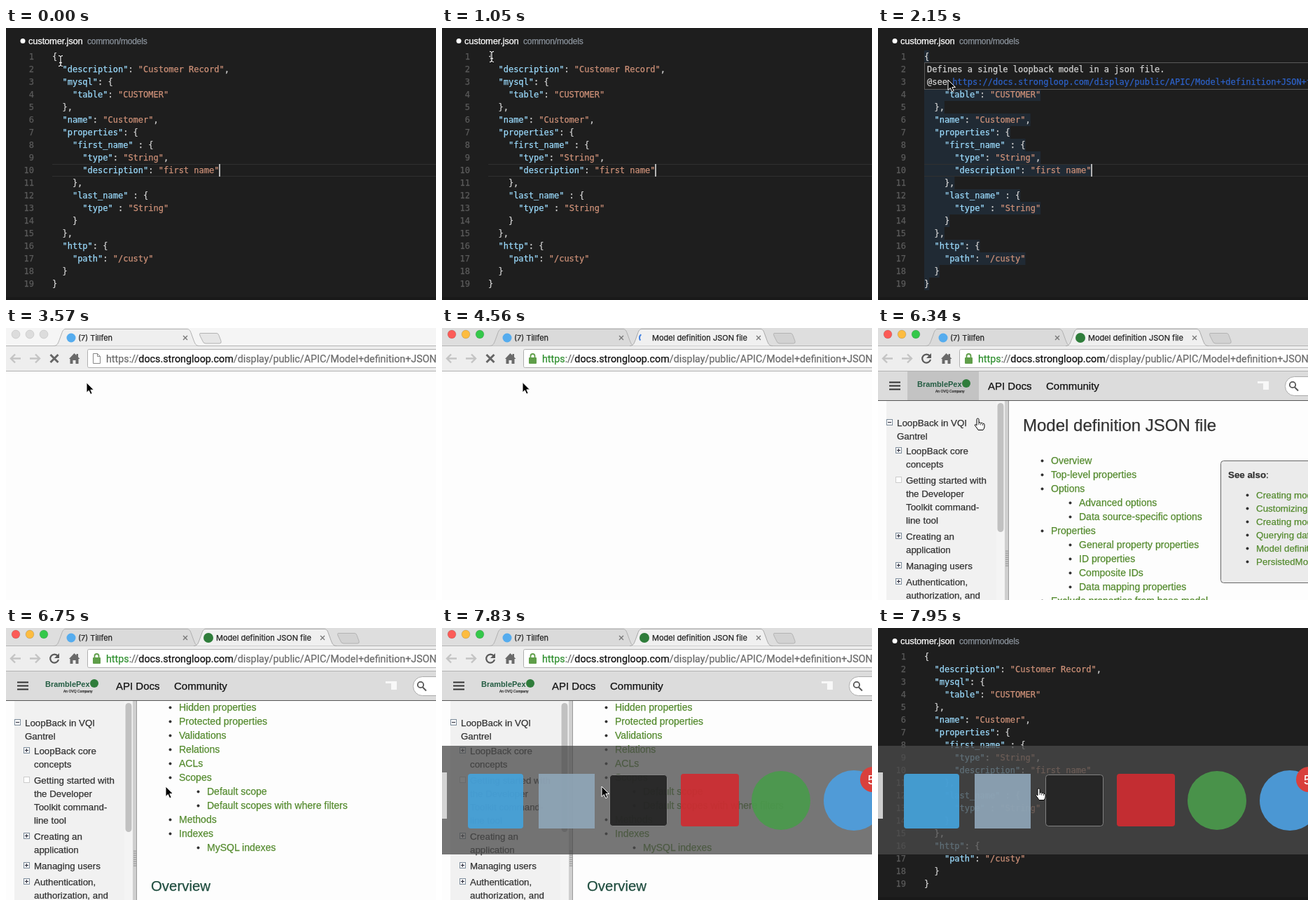
An HTML page that plays this animation: 614 by 388 pixels, repeating every 8000 ms.

```html
<!DOCTYPE html>
<html lang="en">
<head>
<meta charset="utf-8">
<title>Schema hover</title>
<style>
html, body { margin: 0; width: 100%; height: 100%; overflow: hidden; background: #1e1e1e; }
svg { display: block; }
/* The thin outline gives the text a slightly heavier weight. */
text { white-space: pre; font: 14px "Liberation Sans", Arial, sans-serif; color: #333;
  fill: currentColor; stroke: currentColor; stroke-width: .25px; }
.small text { font-size: 13.33px; }
.code text { font: 12px "DejaVu Sans Mono", monospace; color: #d4d4d4; }
.code .key { color: #9cdcfe; }
.code .string { color: #ce9178; }
.code .number { color: #5a5a5a; text-anchor: end; }
.code .link { color: #2d62c8; }
.code .file { font: 13px "Liberation Sans", sans-serif; letter-spacing: -.2px; color: #fff; }
.code .folder { font: 12px "Liberation Sans", sans-serif; letter-spacing: -.2px; color: #8b939c; }
.tabs text { font: 11px Inter, sans-serif; color: #222; }
.url { font: 14.3px Roboto, sans-serif; color: #6b6b6b; }
.domain { color: #111; }
.safe { color: #2f8f2f; }
.nav { font-size: 15px; color: #111; }
text.a { color: #558b2f; }
</style>
</head>
<body>
<svg id="stage" width="614" height="388" viewBox="0 0 614 388"></svg>
<script>
const DURATION = 8000, CHAR = 7.224, LINE = 18;

// Markup helpers
const text = (x, y, s, attrs = '') => `<text x="${x}" y="${y}" ${attrs}>${s}</text>`;
const rect = (x, y, w, h, fill, attrs = '') =>
  `<rect x="${x}" y="${y}" width="${w}" height="${h}" fill="${fill}" ${attrs}/>`;
const circle = (x, y, r, fill, attrs = '') => `<circle cx="${x}" cy="${y}" r="${r}" fill="${fill}" ${attrs}/>`;
const path = (d, attrs) => `<path d="${d}" ${attrs}/>`;
const stroke = (d, color, width = 1, attrs = '') =>
  path(d, `fill="none" stroke="${color}" stroke-width="${width}" ${attrs}`);
const group = (id, body, attrs = '') => `<g id="${id}" ${attrs}>${body}</g>`;

// Editor
const source = `{
  "description": "Customer Record",
  "mysql": {
    "table": "CUSTOMER"
  },
  "name": "Customer",
  "properties": {
    "first_name" : {
      "type": "String",
      "description": "first name"
    },
    "last_name" : {
      "type" : "String"
    }
  },
  "http": {
    "path": "/custy"
  }
}`.split('\n');

const colorize = line => line.replace(/"[^"]*"(?=(\s*:)?)/g, (s, colon) =>
  `<tspan class="${colon ? 'key' : 'string'}">${s}</tspan>`);

const editor = group('editor',
  rect(0, 0, 614, 388, '#1e1e1e') + rect(0, 384, 614, 4, '#191919') +
  circle(24, 18.5, 3.5, '#fff') +
  text(32, 23, 'customer.json', 'class="file"') + text(116, 23, 'common/models', 'class="folder"') +
  group('highlight', source.map((s, i) => rect(66, 32 + i * LINE, s.length * CHAR, LINE, '#202a34')).join('')) +
  group('currentLine', stroke('M66 194.5H614M66 211.5H614', '#303030')) +
  source.map((s, i) => {
    const y = 45 + i * LINE;
    return text(40, y, i + 1, 'class="number"') + text(66, y, colorize(s));
  }).join('') +
  group('caret', rect(304, 194, 2, 18, '#b4b4b4')) +
  group('tooltip',
    rect(66.5, 49.5, 560, 38, '#1e1e1e', 'stroke="#5a5a5a"') +
    text(70, 63, 'Defines a single loopback model in a json file.') +
    text(70, 81, '@see <tspan class="link">https://docs.strongloop.com/display/public/APIC/Model+definition+JSON+file</tspan>')),
  'class="code"');

// Browser window
const tabShape = (x, w) => `M${x} 25.5c5 0 6-3 8-8l4-11c1.5-4 3-5 6-5H${x + w - 18}c3 0 4.5 1 6 5l4 11c2 5 3 8 8 8`;
const cross = (x, y, r, color, w) =>
  stroke(`M${x - r} ${y - r}l${2 * r} ${2 * r}m0 ${-2 * r}l${-2 * r} ${2 * r}`, color, w);
const arrowIcon = (x, dir) => stroke(`M${x} 43.5h${14 * dir}m${-6 * dir} -6l${6 * dir} 6l${-6 * dir} 6`, '#c4c4c4', 2.4);
const lights = (id, colors, edge) => group(id, colors.map((c, i) =>
  circle(14 + i * 20, 9, 5.9, c, `stroke="${edge}" stroke-width=".7"`)).join(''));
const address = scheme => text(143, 49, `${scheme}://<tspan class="domain">docs.strongloop.com</tspan>` +
  '/display/public/APIC/Model+definition+JSON+file', 'class="url"');

const chrome = group('tabs',
  rect(0, 0, 614, 26, '#f5f5f5', 'id="strip"') +
  lights('idleLights', Array(3).fill('#dcdcdc'), '#c4c4c4') +
  lights('liveLights', ['#fc5b57', '#fdbc40', '#34c84a'], '#0003') +
  stroke('M0 25.5H614', '#b4b4b4') +
  path(tabShape(68, 208), 'id="tab1" stroke="#b0b0b0"') +
  circle(93, 14, 6.5, '#55acee') + text(103, 18, '(7) Tillfen') + cross(256, 14, 3, '#777', 1.3) +
  path('M277 7.5h24q2 0 3 3l3 8q1 3.5-2 3.5h-20q-3 0-4-3l-4-8q-1-3.5 0-3.5z', 'id="plus" stroke="#b4b4b4"') +
  path('', 'id="tab2" fill="#f0f0f0" stroke="#a8a8a8"') +
  group('tab2Label', text(300, 18, '', 'id="tabTitle"') + cross(452, 14, 3, '#777', 1.3) +
    path('M0-6A6 6 0 0 1 6 0', 'id="spinner" fill="none" stroke-width="2"') +
    circle(289, 14, 7, '#2f7d3b', 'id="favicon"')), 'class="tabs"') +
  rect(0, 26, 614, 36, '#eeeeee') + stroke('M0 61.5H614', '#b2b2b2') +
  arrowIcon(21, -1) + arrowIcon(34, 1) +
  group('stop', cross(69, 43.5, 5.5, '#666', 3)) +
  group('reload', stroke('M74 40A6 6 0 1 0 75 45', '#5a5a5a', 2.2) + path('M76 36v7h-7z', 'fill="#5a5a5a"')) +
  path('M90 44l7.5-8 3 3v-2h2.5v4.5l2.5 2.5h-2v7h-4v-5h-4v5h-4v-7z', 'fill="#6a6a6a"') +
  rect(116.5, 30.5, 520, 26, '#fff', 'rx="2" stroke="#b0b0b0"') +
  group('plainAddress', path('M124.5 36.5h6l4 4v10h-10zM130.5 36.5v4h4', 'fill="#fff" stroke="#888"') + address('https')) +
  group('secureAddress', stroke('M126.5 43v-3a3 3 0 0 1 6 0v3', '#5f9e49', 1.8) +
    rect(124, 42, 11, 9, '#5f9e49', 'rx="1"') + address('<tspan class="safe">https</tspan>'));

// Documentation page
const header = group('header',
  rect(0, 62, 614, 42, '#dcdcdc') + rect(42, 62, 102, 41, '#c3c3c3', 'id="logoHover"') +
  stroke('M16 77.5h16M16 82.5h16M16 87.5h16', '#333', 2) +
  text(56, 84, 'BramblePex', 'style="font-size:11px;font-weight:bold;color:#235c42;stroke:none"') +
  text(82, 91.5, 'An OVQ Company', 'style="font-size:5px"') + circle(126, 79, 6, '#2f7d3b') +
  group('menu', text(157, 88, 'API Docs', 'class="nav"') + text(240, 88, 'Community', 'class="nav"')) +
  group('tools', rect(542, 76, 8, 3, '#f8f8f8') + rect(550, 76, 8, 12, '#f8f8f8') +
    rect(581.5, 69.5, 120, 27, '#fff', 'rx="13" stroke="#aaa"') +
    circle(592, 81, 4.2, 'none', 'stroke="#555" stroke-width="1.8"') + stroke('M595 84.5l5 5', '#555', 2)) +
  stroke('M0 103.5H614', '#555'));

const treeBox = (x, y, sign) => rect(x + .5, y + .5, 8, 8, '#fff', `stroke="${sign ? '#7a8a99' : '#ccc'}"`) +
  (sign ? stroke(`M${x + 2} ${y + 4.5}h5` + (sign === '+' ? `M${x + 4.5} ${y + 2}v5` : ''), '#223') : '');
const wrapped = (x, y, lines) => lines.map((s, i) => text(x, y + i * 19, s)).join('');
const topics = [
  ['+', 180, 'LoopBack core|concepts'],
  ['', 222, 'Getting started with|the Developer|Toolkit command-|line tool'],
  ['+', 302, 'Creating an|application'],
  ['+', 344, 'Managing users'],
  ['+', 367, 'Authentication,|authorization, and'],
];
const sidebar = group('sidebar',
  rect(12, 104, 157, 284, '#f1f1f1', 'id="sidePanel"') + wrapped(27, 140, ['LoopBack in VQI', 'Gantrel']) +
  group('closedBox', treeBox(12, 130, '+')) +
  group('tree', treeBox(12, 130, '-') +
    topics.map(([sign, y, s]) => treeBox(25, y - 10, sign) + wrapped(40, y, s.split('|'))).join('') +
    rect(169, 104, 12, 284, '#f4f4f4') + rect(170.5, 107, 9, 184, '#c1c1c1', 'rx="4.5"')) +
  rect(181, 104, 6, 284, '#cfcfcf') + stroke('M186.5 104V388', '#999') +
  stroke('M183 317.5V340M185 317.5V340', '#777', 1, 'stroke-dasharray="1.5 1.5"'), 'class="small"');

// A leading dash marks a nested entry.
const contents = `Overview
Top-level properties
Options
-Advanced options
-Data source-specific options
Properties
-General property properties
-ID properties
-Composite IDs
-Data mapping properties
Exclude properties from base model
Hidden properties
Protected properties
Validations
Relations
ACLs
Scopes
-Default scope
-Default scopes with where filters
Methods
Indexes
-MySQL indexes`.split('\n');
const seeAlso = ['Creating models', 'Customizing models', 'Creating model relations', 'Querying data',
  'Model definition reference', 'PersistedModel class'];
const bullet = (x, y, s) => circle(x - 12.5, y - 4.5, 2, '#333') + text(x, y, s, 'class="a"');

const article = `<clipPath id="below"><rect x="187" y="104" width="427" height="284"/></clipPath>` +
  group('content', group('scroller',
    text(207, 147, 'Model definition JSON file', 'style="font-size:24px"') +
    group('byline', text(207, 172, 'Created by Lorn Becktree, last modified on Jun 22, 2016',
      'style="font-size:12px;color:#707070"')) +
    group('body',
      contents.map((s, i) => bullet(s[0] === '-' ? 287 : 247, 194 + i * 20, s.replace(/^-/, ''))).join('') +
      rect(489.5, 189.5, 200, 174, '#ececec', 'id="seeBox" rx="4" stroke="#666"') +
      group('related', text(500, 214, '<tspan font-weight="bold">See also</tspan>:') +
        seeAlso.map((s, i) => bullet(540, 243 + i * 19, s)).join(''), 'class="small"') +
      text(207, 671, 'Overview', 'style="font-size:20.4px;color:#1f4d3f"'))),
    'clip-path="url(#below)"');

const browser = group('browser',
  rect(0, 0, 614, 388, '#fff', 'id="paper"') + article + sidebar + header + chrome);

// App switcher, with plain shapes for the icons
const switcher = group('switcher',
  rect(0, 168, 614, 155, '#4a4a4a', 'opacity=".75"') +
  `<g opacity=".92">` +
  rect(-60, 206, 67, 66, '#dcdcdc') + rect(37, 208, 79, 78, '#45a3dc', 'rx="4"') +
  rect(138, 208, 80, 78, '#8fa6b8') +
  rect(239.5, 209.5, 82, 73, '#242424', 'rx="4" stroke="#888"') +
  rect(341, 208, 83, 75, '#cf2c31', 'rx="4"') + circle(484, 246, 42, '#4a9a4c') +
  circle(588, 246, 43, '#4d9fe0') + '</g>' +
  circle(615, 216, 18, '#d9403c') + text(608, 223, '5', 'style="font-size:18px;color:#fff"'));

const beamShape = 'M-3-7.5q3 0 3 2.5v10q0 2.5-3 2.5M3-7.5q-3 0-3 2.5M3 7.5q-3 0-3-2.5M-2 2.5h4';
const cursors = group('cursor',
  group('beam', stroke(beamShape, '#000', 3) + stroke(beamShape, '#eee', 1.3)) +
  group('arrow', path('M0 0v14.5l3.3-3 2.4 5.3 2.5-1.1-2.4-5.2h4.7z', 'fill="#000" stroke="#fff"')) +
  group('hand', path('M-1 8V1.5a1.5 1.5 0 0 1 3 0V6q2.5-1 2.8.5 2.4-.7 2.7.7 2.5-.3 2.5 1.5V12q0 2-2 4.5H1Q-1 13-4 9.5q1-2 3 .5z',
    'fill="#fff" stroke="#000"') + stroke('M2 6v3M4.8 7v2.5M7.5 8v2', '#000', .8)));

document.getElementById('stage').innerHTML = editor + browser + switcher + cursors;

const el = {};
document.querySelectorAll('#stage [id]').forEach(node => el[node.id] = node);
const show = (id, on) => { el[id].style.display = on ? '' : 'none'; };
const set = (id, name, value) => el[id].setAttribute(name, value);
const shift = (id, x, y) => set(id, 'transform', `translate(${x} ${y})`);
const ease = (t, from, to) => {
  const p = Math.min(1, Math.max(0, (t - from) / (to - from)));
  return p * p * (3 - 2 * p);
};

// Pointer stops: time, x, y
const stops = [[0, 78, 47], [420, 78, 47], [1050, 71, 41], [1640, 71, 41], [2150, 100, 74], [2440, 115, 78],
  [6339, 115, 77], [6340, 142, 129], [6400, 142, 129], [6560, 228, 226], [7890, 228, 226], [7950, 229, 229], [8000, 229, 229]];
function pointer(t) {
  const i = stops.findIndex(s => s[0] > t), [t0, x0, y0] = stops[i - 1], [t1, x1, y1] = stops[i];
  const p = ease(t, t0, t1);
  return [x0 + (x1 - x0) * p, y0 + (y1 - y0) * p];
}
function pointerKind(t) {
  if (t < 1850) return 'beam';
  const overLink = (t >= 2260 && t < 3330) || (t >= 5270 && t < 6400) || t >= 7950;
  return overLink ? 'hand' : 'arrow';
}

function draw(t) {
  const editing = t < 3330, inBrowser = !editing && t < 7950;
  const hovering = editing && t >= 1230;
  const active = t >= 3630, secure = t >= 4450, loaded = t >= 4980, ready = t >= 5270, expanded = t >= 5450;

  show('browser', inBrowser);
  show('highlight', hovering);
  show('tooltip', hovering);
  show('currentLine', editing);
  show('caret', editing && Math.floor((t + 30) / 482) % 2 === 0);

  // Window chrome
  const grow = ease(t, 3630, 3870);
  set('strip', 'fill', active ? '#dedede' : '#f5f5f5');
  show('idleLights', !active);
  show('liveLights', active);
  set('tab1', 'fill', active ? '#dadada' : '#efefef');
  set('plus', 'fill', active ? '#d2d2d2' : '#e6e6e6');
  shift('plus', 197 * grow, 0);
  show('tab2', grow > 0);
  set('tab2', 'd', tabShape(268, 36 + 168 * grow));
  show('tab2Label', grow > .9);
  el.tabTitle.textContent = secure ? 'Model definition JSON file' : 'Loading...';
  show('spinner', !ready);
  set('spinner', 'stroke', secure ? '#3f7fe0' : '#999');
  set('spinner', 'transform', `translate(288 14) rotate(${secure ? t * .36 + 30 : -t * .24})`);
  show('favicon', ready);
  show('stop', !ready);
  show('reload', ready);
  show('plainAddress', !secure);
  show('secureAddress', secure);

  // Page
  set('paper', 'fill', loaded && !ready ? '#f6f6f6' : '#fdfdfd');
  show('header', t >= 4800);
  show('menu', ready);
  shift('tools', ready ? 0 : -49, 0);
  set('logoHover', 'opacity', ready ? 1 - ease(t, 6370, 6600) : 0);
  show('content', loaded);
  show('sidebar', loaded);
  show('sidePanel', ready);
  show('tree', expanded);
  show('closedBox', !expanded);
  show('byline', !ready);
  set('seeBox', 'fill', ready ? '#ebebeb' : '#f6f6f6');
  shift('body', 0, ready ? 0 : 18);
  shift('scroller', 0, -296 * ease(t, 6440, 6750));

  show('switcher', t >= 7830);

  const kind = pointerKind(t);
  ['beam', 'arrow', 'hand'].forEach(name => show(name, name === kind));
  shift('cursor', ...pointer(t));
}

const start = performance.now();
function frame() {
  draw((performance.now() - start) % DURATION);
  requestAnimationFrame(frame);
}
frame();
</script>
</body>
</html>
```
